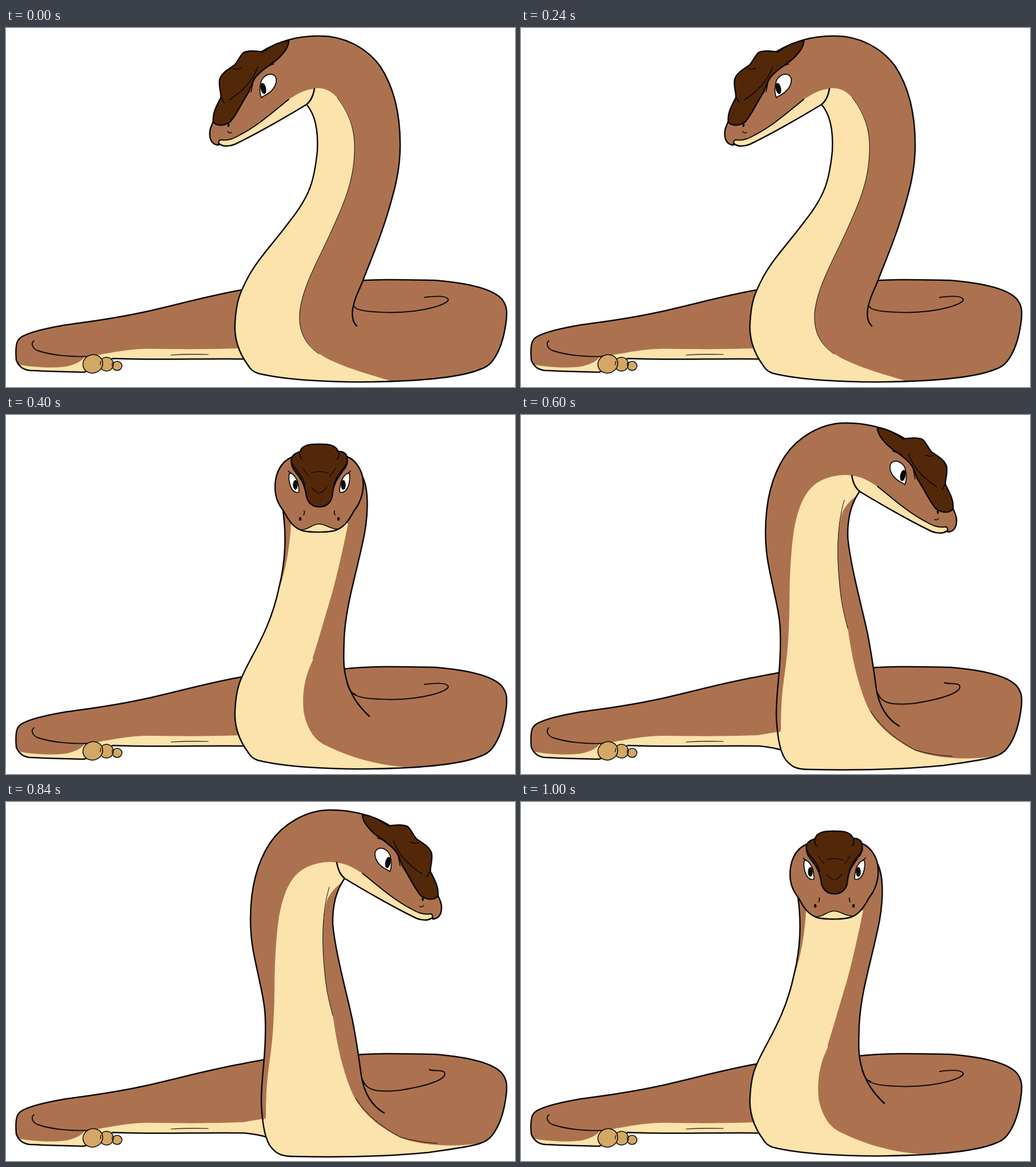
An HTML page with a canvas for the animation above (1.2 s loop, 891 px wide and 629 px high).

```html
<!DOCTYPE html>
<html lang="en">
<head>
<meta charset="utf-8">
<title>Snake looking around</title>
<style>
  html, body { margin: 0; width: 100%; height: 100%; overflow: hidden; background: #fff; }
  canvas { display: block; width: 891px; height: 629px; }
</style>
</head>
<body>
<canvas id="stage" width="891" height="629"></canvas>
<script>
const ctx = document.getElementById('stage').getContext('2d');
const INK = '#0c0a09', BROWN = '#ac724f', CREAM = '#fbe3ab', HAT = '#532809', TAN = '#d3a764';
ctx.lineCap = ctx.lineJoin = 'round';

function fill(d, color) {
  ctx.fillStyle = color;
  ctx.fill(new Path2D(d));
}
function line(d, width = 2.5) {
  ctx.strokeStyle = INK;
  ctx.lineWidth = width;
  ctx.stroke(new Path2D(d));
}
function shape(d, color, width) {
  fill(d, color);
  line(d, width);
}
// A brown form with a cream underside kept inside its outline.
function skin(outline, underside) {
  fill(outline, BROWN);
  ctx.save();
  ctx.clip(new Path2D(outline));
  fill(underside, CREAM);
  ctx.restore();
  line(outline);
}
function oval(x, y, rx, ry, color = INK, tilt = 0, width = 0) {
  ctx.beginPath();
  ctx.ellipse(x, y, rx, ry, tilt, 0, 7);
  ctx.fillStyle = color;
  ctx.fill();
  if (!width) return;
  ctx.strokeStyle = INK;
  ctx.lineWidth = width;
  ctx.stroke();
}
function mirrored(axis, draw) {
  ctx.save();
  ctx.transform(-1, 0, 0, 1, 2 * axis, 0);
  draw();
  ctx.restore();
}

const BASE = `C399 540 405 565 423 590 C428 598 432 602 441 605
  C485 616 560 621 640 620 C700 619 790 615 830 598`;

function tailAndCoil() {
  skin(`M460 449 C444 454 428 455 412 459 C350 470 300 485 240 498 C180 511 140 515 100 521
    C60 528 28 537 22 546 C16 553 17 570 18 582 C22 592 30 599 42 600 C80 602 110 602 137 603
    L170 588 L187 579 C260 582 340 579 417 580 Q440 582 460 588`,
    `M16 588 C40 595 90 597 110 592 C125 588 133 583 137 577 L160 573 C190 568 215 562 255 562
    C310 563 360 563 415 561 L462 553 V610 H16Z`);
  line('M49 548 C43 552 46 561 55 565 C80 574 120 577 150 575', 1.9);
  line('M289 573 Q320 571 354 572', 1.1);
  oval(194.5, 592, 8.5, 8, TAN, 0, 1.5);
  oval(176, 589, 12, 12, TAN, 0, 1.5);
  oval(152, 588.5, 17.5, 16, TAN, -0.3, 1.5);
  line('M166 584 L165 590 M186 587 L186 592', 1.3);
  const coil = `M590 445 C640 439 700 441 750 442 C800 446 850 455 868 475 C877 487 877 495 876 510
    C872 545 862 570 851 584 Q843 594 830 598`;
  fill(coil + ' L590 600Z', BROWN);
  line(coil);
}

function coilFold() {
  line('M610 488 C612 495 640 498 675 498.5 C735 498 777 483 774 475 C770 469 755 469 733 472', 2);
}

function sideHead() {
  const jaw = `M540 106 C538 118 534 128 526 134 C500 150 440 185 400 204
    C390 208 378 208 372 202 L372 205 C361 205 355 195 357 180 C358 172 362 168 364 160
    L385 110 L448 41 Q470 28 495 22`;
  skin(jaw, `M545 106 C520 107 508 118 495 125 C470 145 440 172 410 187
    C400 193 390 197 374 196 L372 202 L380 212 L540 140Z`);
  line('M495 125 C470 145 440 172 410 187 C400 193 390 198 375 196 Q371 198 373 204', 2);
  shape(`M495 22 C480 24 465 30 450 42 C435 40 425 39 416 43 C410 48 407 57 400 65
    C390 72 378 78 374 90 C372 105 377 112 376 122 C368 138 361 150 363 165
    C370 173 382 171 392 165 C405 150 410 135 425 112 C430 100 433 90 437 86
    C452 68 470 62 481 49 C489 40 495 32 495 22Z`, HAT);
  line(`M397 71 Q405 74 411 70 M391 126 C415 110 430 95 441 68 M376 120 L382 131
    M429 112 L432 97 M455 68 L469 63`, 1.6);
  const eye = `M446 97 C447 87 458 78 468 82 C475 86 474 95 470 103
    C463 115 454 117 447 122 C444 115 444 105 446 97Z`;
  fill(eye, '#fff');
  oval(450.5, 106, 4.7, 10, INK, -0.2);
  line(eye, 1.7);
  oval(389.5, 170.5, 1.8, 3, INK, 0.2);
  line('M388 181 Q390 185 395 183', 1.5);
}

function leftPose() {
  skin(`M614 522 C606 515 604 500 609 483 C613 467 618 460 625 442 C636 412 652 378 668 325
    C680 285 690 250 690 205 C690 150 680 105 655 67 C630 33 590 14 550 14
    C515 13 480 22 448 41 L480 75 L526 134 C540 150 547 175 545 215
    C540 265 533 293 497 338 C470 375 440 405 422 440 C409 465 403 480 401 515 ${BASE}`,
    `M526 134 L538 106 C560 102 575 115 585 128 C605 155 611 185 610 215
    C609 270 590 310 570 355 C545 410 518 455 514 500 C512 540 530 560 560 578
    C600 598 640 608 672 618 L660 630 H390 V440 L500 300 L515 134Z`);
  line(`M580 122 C605 155 611 185 610 215 C609 270 590 310 570 355
    C545 410 518 455 514 500 C512 535 526 556 548 571`, 1);
  coilFold();
  sideHead();
}

function frontFaceHalf() {
  const eye = 'M497 101 C507 105 513 118 513 135 C504 138 498 129 496 117 Q494 106 497 101Z';
  fill(eye, '#fff');
  oval(506.5, 122.5, 4.2, 8.5);
  line(eye, 1.7);
  line('M494 98 L499 103 M522 168 Q523 172 521 175', 1.7);
  oval(515, 182, 2.2, 3.3);
  line('M516 62 Q512 70 517 77 M500 82 C503 95 517 100 523 122', 2);
  line('M520 93 Q524 101 531 109', 1.1);
}

function frontPose() {
  skin(`M636 528 C617 510 602 490 595 460 C590 440 591 420 592 390 C595 335 610 290 624 225
    C634 182 636 135 625 110 L548 90 L485 168 C491 212 489 258 478 302
    C465 365 440 405 422 440 C409 465 403 480 401 515 ${BASE}`,
    `M499 190 C497 230 490 270 479 302 L390 450 V630 H680 L700 617 C640 612 600 598 560 579
    C540 570 527 550 521 520 C518 490 522 460 537 430 L537 425 C545 400 555 365 567 325
    C573 310 590 235 599 190Z`);
  coilFold();
  line('M597 470 Q602 486 612 491', 2);
  const head = `M500 74 C480 82 470 105 471 130 C472 150 480 160 487 170 C495 185 503 198 520 203
    C535 206 565 206 577 202 C593 197 603 180 609 168 C620 155 627 135 625 115
    C624 98 613 79 597 73`;
  const lip = 'M514 201 C530 202 535 191 548 191 C560 191 566 200 582 200';
  skin(head, lip + ' L570 210 H520Z');
  line(lip, 1.6);
  shape(`M515 64 C518 53 530 51 548 51 C566 51 578 53 581 64 C590 63 597 68 597 76
    C599 85 595 92 590 97 C578 115 573 120 571 143 C568 156 558 161 548 161
    C535 161 528 152 526 143 C523 120 515 110 507 100 C500 92 498 85 500 75
    C503 68 510 66 515 64Z`, HAT);
  line('M535 101 Q549 97 564 102 M535 127 Q541 134 548 137 Q556 134 562 127', 1.3);
  frontFaceHalf();
  mirrored(548.5, frontFaceHalf);
}

function rightPose() {
  skin(`M662 545 C640 532 627 510 622 480 C618 450 614 420 606 380 C595 330 577 265 572 215
    C571 180 578 155 592 135 L630 75 L671 41 C640 22 600 13 565 14
    C525 15 485 38 462 72 C437 110 428 155 428 205 C428 250 436 275 443 310
    C453 355 455 370 454 410 C453 460 446 490 447 530 C449 570 455 595 465 606
    C475 618 485 621 505 621 C600 623 680 620 740 614 C780 608 815 604 830 598`,
    `M595 135 L579 106 C560 103 540 108 525 115 C495 130 485 165 478 200
    C472 240 470 290 470 330 C469 400 465 430 460 465 C455 500 455 530 455 553 L445 562
    V630 H830 V598 C780 605 725 602 690 588 C655 570 620 545 604 505
    C590 470 580 430 573 380 C572 370 562 340 558 300 C553 250 553 205 562 172
    Q570 153 592 138Z`);
  line('M566 149 C552 195 553 250 558 300 C561 335 568 358 572 374', 1);
  line('M612 519 C630 548 660 571 690 587 Q720 596 755 598', 1);
  line('M625 488 C632 509 660 508 690 505 C740 497 775 485 767 473 C760 469 750 472 741 469', 2);
  mirrored(559.5, sideHead);
}

function draw() {
  const t = performance.now() % 1200;
  ctx.fillStyle = '#fff';
  ctx.fillRect(0, 0, 891, 629);
  tailAndCoil();
  if (t < 400) leftPose();
  else if (t >= 600 && t < 1000) rightPose();
  else frontPose();
  requestAnimationFrame(draw);
}
draw();
</script>
</body>
</html>
```
